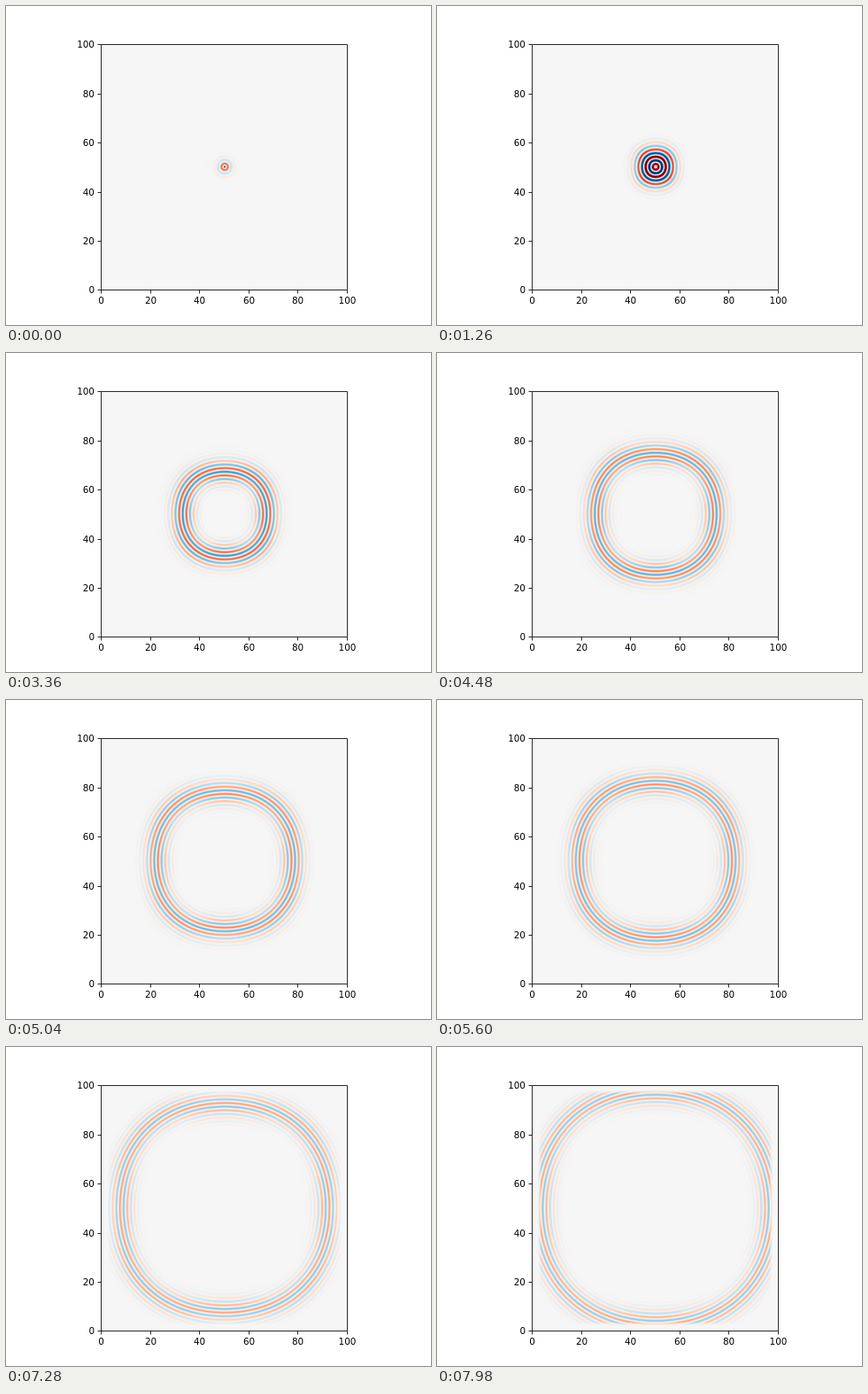
An HTML page with a canvas for the animation above (8 s loop, 480 px wide and 360 px high).

```html
<!DOCTYPE html>
<html lang="en">
<head>
<meta charset="utf-8">
<title>Expanding wave packet</title>
<style>
html, body { margin: 0; width: 100%; height: 100%; overflow: hidden; background: #fff; }
canvas, svg { position: absolute; left: 0; top: 0; width: 480px; height: 360px; }
text { font: 10.42px "DejaVu Sans", sans-serif; }
path { stroke: #000; stroke-width: .83; fill: none; }
</style>
</head>
<body>
<canvas id="field" width="480" height="360"></canvas>
<svg id="axes" viewBox="0 0 480 360"></svg>
<script>
const LOOP = 8000, STEP = 70;
const BOX = { left: 107, top: 43, size: 278 };
const SOURCE = { x: 247, y: 181.45 };
const WAVELENGTH = 8.3, WIDTH = 9.8;
const PHASE_SPEED = 1.34, GROUP_SPEED = 1.22;   // pixels per step along the axes
const START = -10.3;                            // packet centre at step 0

const STOPS = ['67001f', 'b2182b', 'd6604d', 'f4a582', 'fddbc7', 'f6f6f6',
  'd1e5f0', '92c5de', '4393c3', '2166ac', '053061']
  .map(hex => [0, 2, 4].map(i => parseInt(hex.slice(i, i + 2), 16)));

const SHADES = 512;
const palette = Array.from({ length: SHADES + 1 }, (_, i) => {
  const p = i / SHADES * 10, n = Math.min(9, Math.floor(p));
  return STOPS[n].map((c, j) => c + (STOPS[n + 1][j] - c) * (p - n));
});

const ctx = document.getElementById('field').getContext('2d');
const image = ctx.createImageData(BOX.size, BOX.size);
image.data.fill(255);

const clamp = (v, lo, hi) => Math.max(lo, Math.min(hi, v));
const edgeFade = (x, y) =>
  clamp(Math.min(x - 113.5, 379.5 - x, y - 48.5, 314.5 - y) / 4, 0, 1);

// Diagonal directions travel slightly faster than the axes.
const points = [];
for (let j = 0; j < BOX.size; j++) {
  for (let i = 0; i < BOX.size; i++) {
    const px = BOX.left + i + .5, py = BOX.top + j + .5;
    const x = px - SOURCE.x, y = py - SOURCE.y;
    const r2 = x * x + y * y + 1e-6, r = Math.sqrt(r2);
    const skew = 8 * x * x * y * y / (r2 * r2);
    points.push({
      r,
      phase: (r + .3) / (1 + .0115 * skew),
      gain: 4.35 / Math.sqrt(r + 5) * edgeFade(px, py),
      speed: GROUP_SPEED * (1 + .038 * skew)
    });
  }
}

function drawField(step) {
  const k = 2 * Math.PI / WAVELENGTH;
  points.forEach((p, n) => {
    const d = (p.r - START - p.speed * step) / WIDTH;
    const value = Math.abs(d) > 4 ? 0
      : p.gain * Math.exp(-d * d / 2) * Math.cos(k * (p.phase - PHASE_SPEED * step));
    const shade = palette[Math.round((clamp(value, -1, 1) + 1) / 2 * SHADES)];
    image.data.set(shade, n * 4);
  });
  ctx.putImageData(image, BOX.left, BOX.top);
}

function drawAxes() {
  let lines = 'M107.5 43.5H385.5V320.5H107.5Z', labels = '';
  for (let i = 0; i <= 5; i++) {
    const x = Math.round(107.4 + i * 55.44), y = Math.round(320.4 - i * 55.44);
    lines += `M${x + .5} 320.5v4M107.5 ${y + .5}h-4`;
    labels += `<text x="${x + .5}" y="336" text-anchor="middle">${i * 20}</text>` +
      `<text x="100" y="${y + 4}" text-anchor="end">${i * 20}</text>`;
  }
  document.getElementById('axes').innerHTML = `<path d="${lines}"/>${labels}`;
}

let shown = -1;
function tick() {
  const step = Math.floor(performance.now() % LOOP / STEP);
  if (step !== shown) drawField(shown = step);
  requestAnimationFrame(tick);
}

drawAxes();
tick();
</script>
</body>
</html>
```
